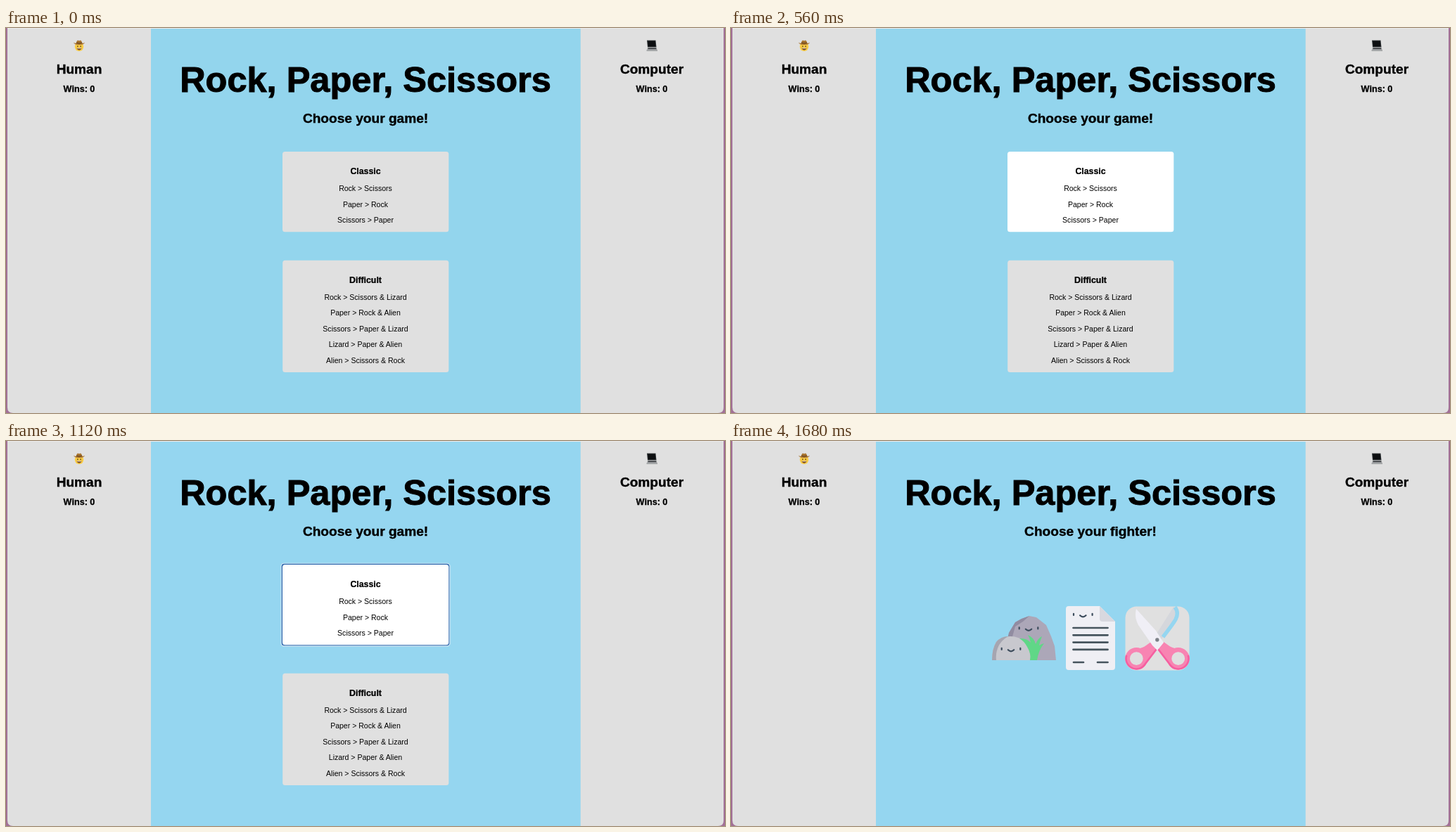
Animation, 1022 px wide and 548 px high, one loop 1750 ms. Source, as an HTML page:

```html
<!DOCTYPE html>
<html lang="en">
<head>
<meta charset="utf-8">
<title>Rock, Paper, Scissors</title>
<style>
  html, body { margin: 0; width: 100%; height: 100%; overflow: hidden; background: #a27096; }
  svg { display: block; width: 1022px; height: 548px; }
  text { font-family: "Liberation Sans", Arial, sans-serif; text-anchor: middle; fill: #000; }
  .title, .head, .wins, .name { font-weight: bold; stroke: #000; stroke-width: .02em; }
  .title { font-size: 50.5px; }
  .head { font-size: 19.1px; }
  .wins { font-size: 12.64px; }
  .name { font-size: 12.32px; }
  .rule { font-size: 10.53px; }
  .card { fill: #e0e0e0; }
  #board { fill: #93d5ed; }
  #ring, #fight { visibility: hidden; }
  .hover #classic, .focus #classic { fill: #fff; }
  .focus #ring, .fight #fight { visibility: visible; }
  .fight #menu { visibility: hidden; }
  .focus #board, .fight #board { fill: #95d6f0; }
  .face { fill: none; stroke: #3c4c5c; stroke-width: 2.2; stroke-linecap: round; }
</style>
</head>
<body>
<svg id="stage" viewBox="0 0 1022 548">
  <defs>
    <g id="face" class="face">
      <path d="M-13.3-1.2v2.2M13.3-1.2v2.2M-4.2 1.2Q0 5.4 4.2 1.2"/>
    </g>
    <g id="handle">
      <path fill="#f884b2" d="M575 295Q584 296 590 291L597 286L606 295L590 316L582 300Z"/>
      <circle cx="576.3" cy="309.7" r="12.6" fill="#e0e0e0" stroke="#f884b2" stroke-width="6.4"/>
      <path d="M562.300 305A14.700 14.700 0 0 0 589 317L605 296" fill="none" stroke="#f65fa0" stroke-width="2.600"/>
    </g>
  </defs>

  <rect width="1022" height="548" fill="#a27096"/>
  <path d="M2 0H1020V540Q1020 548 1012 548H10Q2 548 2 540Z" fill="#e0e0e0"/>
  <rect id="board" x="206" y="1" width="610.700" height="547"/>
  <rect x="2" width="1018" height="1" fill="#ececec"/>

  <g id="cowboy">
    <circle cx="104" cy="26.800" r="6.200" fill="#f8cb45"/>
    <path d="M96 20.500Q98 22.500 100 21Q100.500 17.500 102.500 17.500L104 18.200L105.500 17.500Q107.500 17.500 108 21Q110 22.500 112 20.500Q111 24 104 24T96 20.500Z" fill="#a8742f"/>
    <path d="M100 21Q104 22.700 108 21" fill="none" stroke="#5b391a"/>
    <path d="M101.900 25.300v1.700M106.100 25.300v1.700" stroke="#4b3413" stroke-width="1.200"/>
    <path d="M100.500 28.500H107.500Q106.500 31.500 104 31.500T100.500 28.500Z" fill="#75451d"/>
    <path d="M101.200 28.900H106.800" stroke="#fff" stroke-width=".8"/>
  </g>
  <g id="laptop">
    <path d="M911 17.500H923.500L924.500 27.500H912Z" fill="#34383b"/>
    <path d="M912 18.500H922.700L923.500 26.600H912.800Z" fill="#0d0f11"/>
    <path d="M912 27.500H924.500L926 32H910.500Z" fill="#b4b6b8"/>
    <path d="M912.700 28.300H924L924.700 30.200H912.200Z" fill="#424548"/>
    <path d="M910.500 32.200H926" stroke="#777a7c" stroke-width=".8"/>
  </g>

  <text class="title" x="511" y="90.500">Rock, Paper, Scissors</text>
  <text class="head" id="prompt" x="511" y="135"></text>
  <text class="head" x="104" y="65">Human</text>
  <text class="wins" x="104" y="91">Wins: 0</text>
  <text class="head" x="918" y="65">Computer</text>
  <text class="wins" x="918" y="91">Wins: 0</text>

  <g id="menu">
    <g id="ring">
      <rect x="390.500" y="173.800" width="241" height="118.800" rx="4.500" fill="#d3e6f3"/>
      <rect x="391.700" y="174.700" width="238.600" height="116.600" rx="3.500" fill="#2a66ad"/>
    </g>
    <rect class="card" id="classic" x="393" y="176" width="236.300" height="114.300" rx="3.500"/>
    <rect class="card" x="393.200" y="330.700" width="236.100" height="159.300" rx="3.500"/>
  </g>

  <g id="fight">
    <g id="rock">
      <path d="M392 312L395 273L404 258L413 253L424 249L434 251L448 262L455 278L460 292L462 312Z" fill="#aca7b8"/>
      <path d="M392 285L395 273L404 258L413 253L424 249L415 257L404 264L399 282Z" fill="#918ca1"/>
      <use href="#face" x="423" y="266.500"/>
      <path d="M371 312Q371 296 377 286Q384 278 397 278Q410 278 418 287Q426 298 427 312Z" fill="#c8c8ce"/>
      <path d="M371 312Q371 296 377 286Q384 278 394 278Q383 284 379 295Q376 303 377 312Z" fill="#a5a5b0"/>
      <use href="#face" x="398" y="296"/>
      <path d="M425 312Q427 303 421 293Q417 285 410 281Q420 280 426 287Q425 281 422 276Q431 280 433 289Q436 281 442 278Q439 285 438 291Q441 289 445 288Q437 298 435 312Z" fill="#60d787"/>
    </g>
    <g id="paper">
      <path d="M480 235H524L546 257V322Q546 326 542 326H480Q476 326 476 322V239Q476 235 480 235Z" fill="#efeff4"/>
      <path d="M524 235L546 257H528Q524 257 524 253Z" fill="#d8d8df"/>
      <use href="#face" x="500.300" y="247"/>
      <path d="M486.500 266H535.500M486.500 276.300H535.500M486.500 286.600H535.500M486.500 296.900H535.500M487 315H501M521 315H535.500" stroke="#46545d" stroke-width="2.700" stroke-linecap="round"/>
    </g>
    <g id="scissors">
      <rect x="560.500" y="235.500" width="91" height="91" rx="16" fill="#e0e0e0"/>
      <path d="M629 236Q640 245 632 256L612 282L602 294L597 287Z" fill="#d5d7dc"/>
      <path d="M631 236.500Q637 244 632 254Q628 261 614 279" fill="none" stroke="#95d6f0" stroke-width="5.500"/>
      <use href="#handle"/>
      <use href="#handle" transform="matrix(-1 0 0 1 1212 0)"/>
      <path d="M576 239Q573 251 579 262L599 291L606 298L615 287L604 270Z" fill="#f0eff6"/>
      <circle cx="605.800" cy="283" r="2.700" fill="#7b8087"/>
    </g>
  </g>
</svg>
<script>
const stage = document.getElementById("stage");
const prompt = document.getElementById("prompt");
const menu = document.getElementById("menu");
const LOOP = 1750;
const STEPS = [[0, "idle"], [70, "hover"], [1120, "focus"], [1190, "fight"]];

function addText(cls, y, str) {
  const el = document.createElementNS(stage.namespaceURI, "text");
  el.setAttribute("class", cls);
  el.setAttribute("x", 511);
  el.setAttribute("y", y);
  el.textContent = str;
  menu.append(el);
}

function addCard(y, name, rules) {
  addText("name", y, name);
  rules.forEach((rule, i) => addText("rule", y + 24.4 + i * 22.4, rule));
}

addCard(207.8, "Classic", ["Rock > Scissors", "Paper > Rock", "Scissors > Paper"]);
addCard(362.6, "Difficult", [
  "Rock > Scissors & Lizard", "Paper > Rock & Alien", "Scissors > Paper & Lizard",
  "Lizard > Paper & Alien", "Alien > Scissors & Rock"
]);

let state;
const start = performance.now();

function draw(now) {
  const t = Math.max(0, now - start) % LOOP;
  const next = STEPS.findLast(([at]) => t >= at)[1];
  if (next !== state) {
    state = next;
    stage.setAttribute("class", state);
    prompt.textContent = `Choose your ${state === "fight" ? "fighter" : "game"}!`;
  }
  requestAnimationFrame(draw);
}
draw(start);
</script>
</body>
</html>
```
